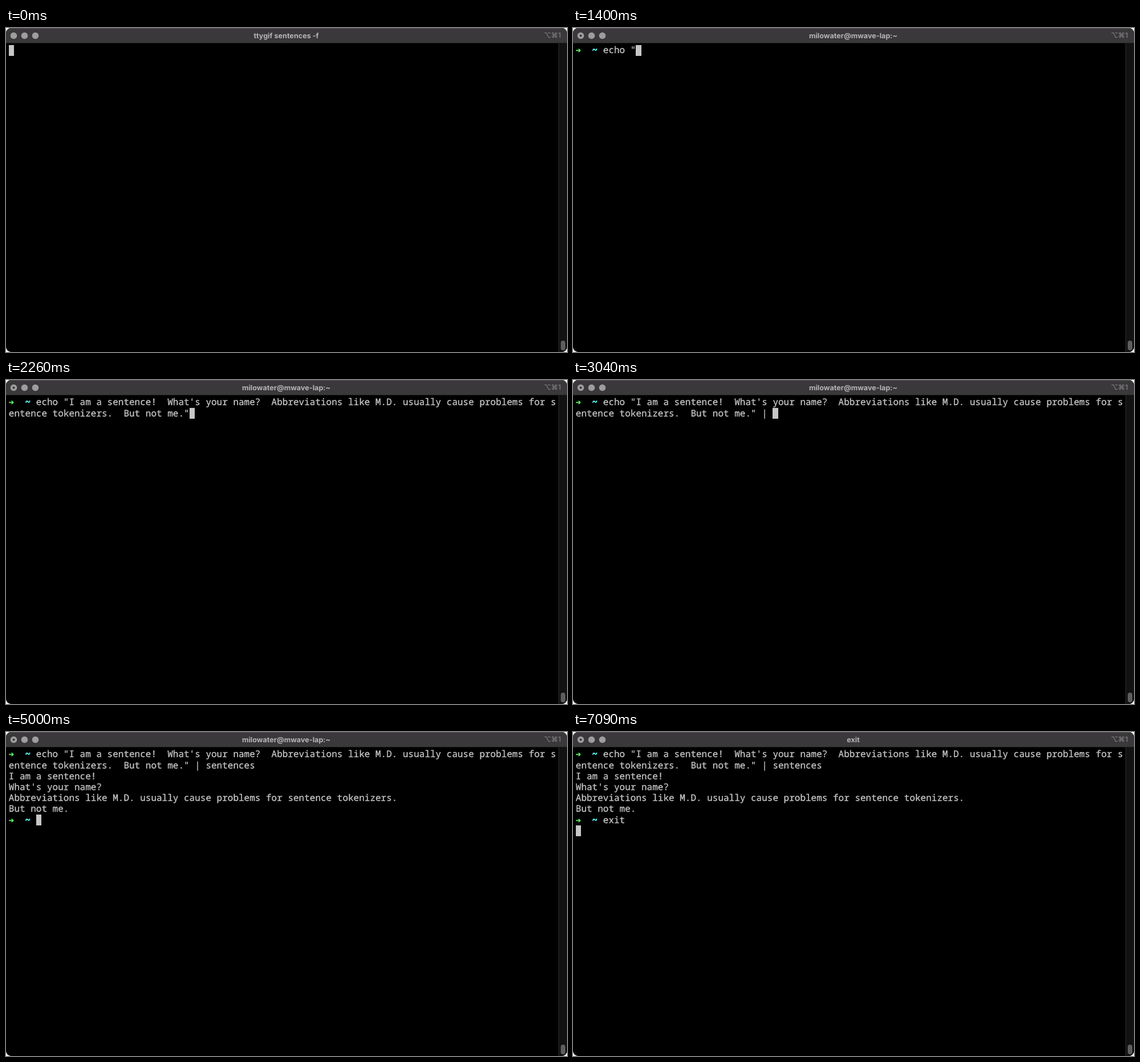
Recreate the animation shown at these times as an HTML page. Size 984 px wide and 569 px high, loop 8090 ms.

```html
<!DOCTYPE html>
<html lang="en">
<head>
<meta charset="utf-8">
<title>Terminal session</title>
<style>
  html, body { margin: 0; width: 100%; height: 100%; overflow: hidden; background: #fff; }
  svg { display: block; width: 984px; height: 569px; }
  text { text-rendering: geometricPrecision; white-space: pre; }
  .title { font: 700 12.6px Inter, sans-serif; fill: #b6b5b6; text-anchor: middle; }
  .hint { font: 500 12.4px Inter, "DejaVu Sans", sans-serif; fill: #828082; text-anchor: end; }
  .out { font: 16px "Noto Sans Mono", monospace; fill: #c7c7c7; stroke: #c7c7c7; stroke-width: 0.3px; }
  .pasted { fill: #000; stroke: #000; }
  .tilde { font-weight: 700; fill: #60fdff; stroke: #60fdff; stroke-width: 0.6px; }
  .arrow { font: 700 11.5px "DejaVu Sans", sans-serif; fill: #5ffa68; stroke: #5ffa68; stroke-width: 0.3px; }
  .block { fill: #c7c7c7; }
  .button { fill: #9e9d9e; }
</style>
</head>
<body>
<svg viewBox="0 0 984 569">
  <clipPath id="frame"><rect width="984" height="569" rx="9"/></clipPath>
  <g clip-path="url(#frame)">
    <rect width="984" height="569"/>
    <rect width="984" height="26.5" fill="#3a383a"/>
    <rect width="984" height="1" fill="#5b595b"/>
    <rect x="969" y="27" width="15" height="542" fill="#121212"/>
    <rect x="969" y="27" width="1" height="542" fill="#2c2c2c"/>
    <rect x="973" y="549" width="8" height="17" rx="4" fill="#5e5e5e"/>
    <circle class="button" cx="13.5" cy="13.5" r="5.8"/>
    <circle class="button" cx="32.5" cy="13.5" r="5.8"/>
    <circle class="button" cx="51.5" cy="13.5" r="5.8"/>
    <circle id="busy" cx="13.5" cy="13.5" r="2" fill="#3a383a"/>
    <text id="title" class="title" x="491.5" y="17.5"></text>
    <text class="hint" x="973.5" y="16.5">⌥⌘1</text>
    <g id="screen"></g>
  </g>
</svg>
<script>
const LOOP = 8090, COLS = 100, CW = 9.6, CH = 19.2, LEFT = 4.8, TOP = 29.8;
const HOST = "milowater@mwave-lap:~";
const LINES = [
  "I am a sentence!",
  "What's your name?",
  "Abbreviations like M.D. usually cause problems for sentence tokenizers.",
  "But not me."
];
const PASTE = LINES.join("  ");

// [time, typed text]
const COMMAND = [
  [710, "e"], [870, "c"], [920, "h"], [970, "o"], [1120, " "], [1400, '"'],
  [1920, PASTE], [2260, '"'], [2740, " "], [2900, "|"], [3040, " "],
  [3420, "s"], [3580, "e"], [3700, "n"], [3840, "t"], [3930, "e"], [4020, "n"],
  [4160, "c"], [4215, "e"], [4270, "s"]
];
const EXIT = [[6300, "e"], [6480, "x"], [6580, "i"], [6680, "t"]];
const RUN = 4770, OUTPUT = 4850, DONE = 4920, PROMPT = 5000, QUIT = 7090;

const TITLES = [[0, "ttygif sentences -f"], [100, HOST], [RUN, "echo"], [DONE, HOST], [QUIT, "exit"]];
const STOPS = [...COMMAND, ...EXIT, ...TITLES, [200], [OUTPUT], [PROMPT]]
  .map(s => s[0]).sort((a, b) => a - b);

const byId = id => document.getElementById(id);
const screen = byId("screen");
let col, row;

function add(tag, attrs, content = "") {
  const el = document.createElementNS("http://www.w3.org/2000/svg", tag);
  for (const key in attrs) el.setAttribute(key, attrs[key]);
  el.textContent = content;
  screen.append(el);
}

function block(count = 1) {
  const x = Math.round(LEFT + col * CW), y = Math.round(TOP + row * CH);
  add("rect", {
    class: "block", x, y, height: 19,
    width: Math.round(LEFT + (col + count) * CW) - x
  });
}

function newline() {
  col = 0;
  row++;
}

// Writes text at the cell position, wrapping at the last column
function print(text, style = "") {
  while (text) {
    if (col === COLS) newline();
    const part = text.slice(0, COLS - col);
    if (style === "pasted") block(part.length);
    add("text", { class: "out " + style, x: LEFT + col * CW, y: TOP + row * CH + 14.6 }, part);
    col += part.length;
    text = text.slice(part.length);
  }
}

function prompt() {
  add("text", { class: "arrow", x: LEFT - 0.3, y: TOP + row * CH + 13.5 }, "➜");
  col = 3;
  print("~", "tilde");
  col = 5;
}

function typed(keys, t) {
  return keys.filter(k => k[0] <= t).map(k => k[1]).join("");
}

function draw(t) {
  screen.replaceChildren();
  col = row = 0;
  byId("title").textContent = TITLES.filter(s => s[0] <= t).pop()[1];
  byId("busy").style.display = t < 100 ? "none" : "";

  if (t >= 200) {
    prompt();
    if (t >= 1920 && t < 2260) {
      print('echo "');
      print(PASTE, "pasted");
    } else {
      print(typed(COMMAND, t));
    }
  }
  if (t >= RUN) newline();
  if (t >= OUTPUT) {
    for (const line of LINES) {
      print(line);
      newline();
    }
  }
  if (t >= PROMPT) {
    prompt();
    print(typed(EXIT, t));
  }
  if (t >= QUIT) newline();
  block();
}

const start = performance.now();
let shown = -1;

function tick(now) {
  const t = Math.max(0, now - start) % LOOP;
  const stop = STOPS.filter(s => s <= t).pop();
  if (stop !== shown) draw(shown = stop);
  requestAnimationFrame(tick);
}
tick(start);
</script>
</body>
</html>
```
